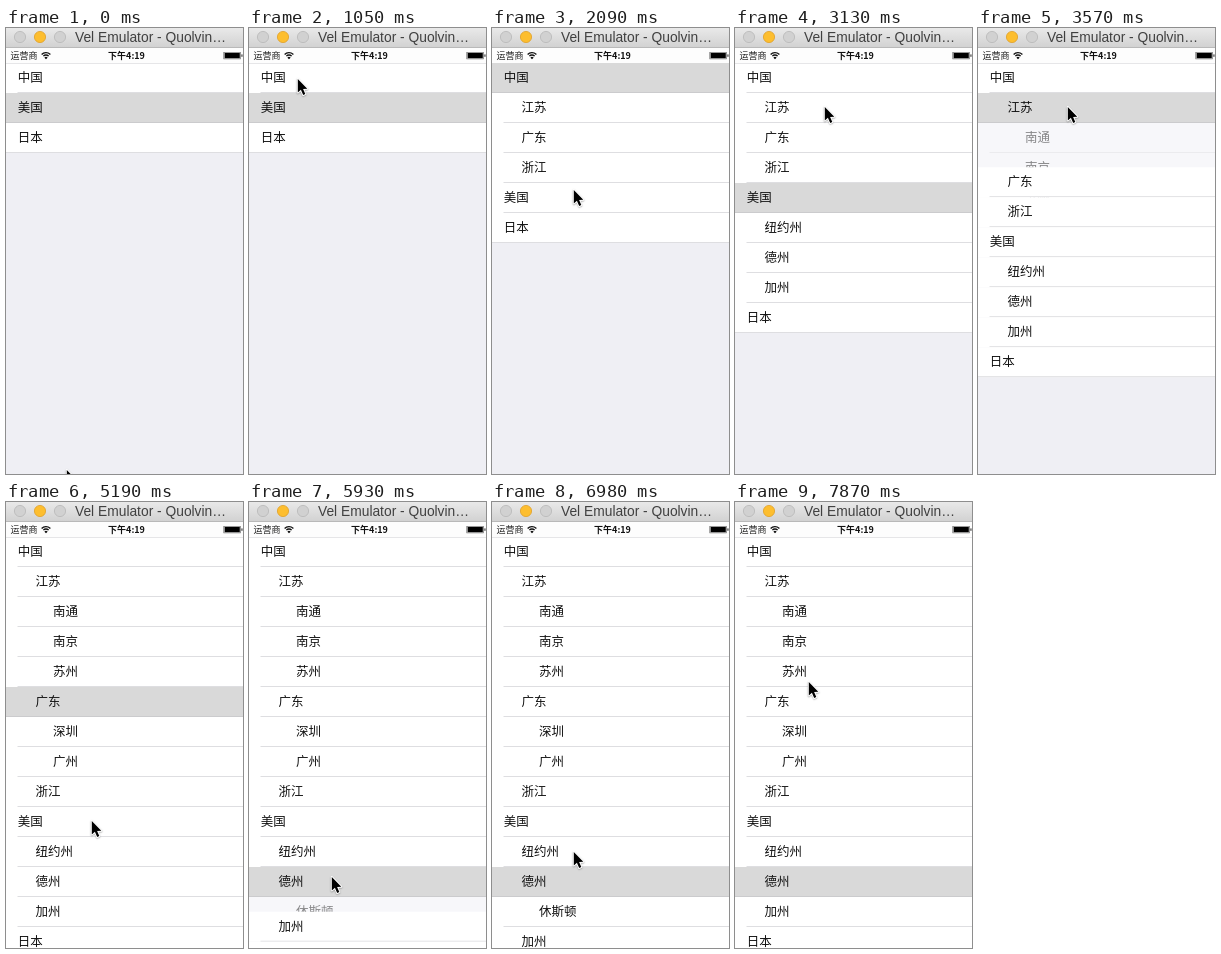
An HTML page with a canvas that plays this animation: 237 by 446 pixels, repeating every 8 s.

```html
<!DOCTYPE html>
<html lang="zh-CN">
<head>
<meta charset="utf-8">
<title>Tree list</title>
<style>
  html, body { margin: 0; width: 100%; height: 100%; overflow: hidden; background: #efeff4; }
  canvas { display: block; width: 237px; height: 446px; }
</style>
</head>
<body>
<canvas id="stage"></canvas>
<script>
const W = 237, H = 446, LOOP = 8000;
const STEP = 148.2;
const SLIDE = 300;             // row animation, ms
const ROW = 30, TOP = 35;
const CJK = '"Noto Sans CJK SC", "Noto Sans CJK JP", sans-serif';
const LATIN = '"Liberation Sans", Arial, sans-serif';

const canvas = document.getElementById('stage');
const ctx = canvas.getContext('2d');
const dpr = window.devicePixelRatio || 1;
canvas.width = W * dpr;
canvas.height = H * dpr;

const node = (name, ...kids) => ({ name, kids });
const tree = [
  node('中国',
    node('江苏', node('南通'), node('南京'), node('苏州')),
    node('广东', node('深圳'), node('广州')),
    node('浙江')),
  node('美国',
    node('纽约州'),
    node('德州', node('休斯顿')),
    node('加州')),
  node('日本')
];

// Each click selects a row and toggles its children.
const clicks = [
  [9, '中国'], [17, '美国'], [23, '江苏'], [31, '广东'], [39, '德州'], [49, '德州']
];

// Pointer path: step, x, y
const path = [
  [0, 60, 441], [1, 60, 425], [3, 69, 328], [4, 80, 210], [5, 85, 140],
  [7, 48, 50], [11, 48, 50], [14, 81, 161], [18, 81, 161], [21, 89, 78],
  [25, 89, 78], [30, 97, 205], [32, 97, 205], [35, 85, 318], [38, 82, 374],
  [43, 82, 374], [47, 81, 349], [49, 82, 370], [50, 82, 366], [53, 73, 179]
];

const clamp = v => Math.max(0, Math.min(1, v));
const ease = v => v * v * (3 - 2 * v);

function box(color, x, y, w, h) {
  ctx.fillStyle = color;
  ctx.fillRect(x, y, w, h);
}

function text(str, x, y, font, color, align = 'left') {
  ctx.font = font;
  ctx.fillStyle = color;
  ctx.textAlign = align;
  ctx.fillText(str, x, y);
}

function selectedAt(step) {
  const done = clicks.filter(([at]) => at <= step);
  return done.length ? done[done.length - 1][1] : '美国';
}

function openness(name, step) {
  let v = 0;
  for (const [at, target] of clicks) {
    if (target !== name || at > step) continue;
    const p = ease(clamp((step - at) * STEP / SLIDE));
    v = v ? 1 - p : p;
    if (v > 0.99) v = 1;
    if (v < 0.01) v = 0;
  }
  return v;
}

// Returns the y below the given rows; children fade in place while later rows slide.
function place(nodes, y, depth, alpha, step, out) {
  for (const n of nodes) {
    out.push({ name: n.name, y, depth, alpha });
    y += ROW;
    const v = n.kids.length ? openness(n.name, step) : 0;
    if (v > 0) y += (place(n.kids, y, depth + 1, alpha * v, step, out) - y) * v;
  }
  return y;
}

function drawRow(row, selected) {
  const on = row.name === selected;
  const left = on || row.name === '日本' ? 0 : 11.5;
  ctx.globalAlpha = row.alpha;
  box(on ? '#d9d9d9' : '#ffffff', 0, row.y, W, ROW);
  box(on ? '#cbcbcd' : '#dedee1', left, row.y + 29, W - left, 1);
  text(row.name, 11.8 + 17.6 * row.depth, row.y + 19.3, '12.5px ' + CJK, '#111');
  ctx.globalAlpha = 1;
}

function drawList(step) {
  const rows = [];
  const selected = selectedAt(step);
  place(tree, TOP, 0, 1, step, rows);
  rows.sort((a, b) => a.alpha - b.alpha);
  rows.forEach(row => drawRow(row, selected));
  if (selected !== '中国') box('#e6e6e8', 0, TOP, W, 1);
}

function light(x, fill, edge) {
  ctx.beginPath();
  ctx.arc(x, 9, 5.6, 0, Math.PI * 2);
  ctx.fillStyle = fill;
  ctx.fill();
  ctx.lineWidth = 0.8;
  ctx.strokeStyle = edge;
  ctx.stroke();
}

function drawTitle() {
  const g = ctx.createLinearGradient(0, 0, 0, 19);
  g.addColorStop(0, '#e9e9e9');
  g.addColorStop(1, '#d2d2d2');
  box(g, 0, 0, W, 19);
  box('#b9b9b9', 0, 19, W, 1);
  light(14, '#d1d1d1', '#b8b8b8');
  light(34, '#fdbe2f', '#e0a028');
  light(54, '#d1d1d1', '#b8b8b8');
  text('Vel Emulator - Quolvin…', 69, 14, '13.8px ' + LATIN, '#404040');
}

function drawStatus() {
  box('#fdfdfd', 0, 20, W, 15);
  text('运营商', 4.5, 31, '9px ' + CJK, '#222');
  text('下午4:19', 120.5, 31, 'bold 9px ' + CJK, '#111', 'center');

  ctx.strokeStyle = '#111';
  ctx.lineWidth = 1.3;
  for (const r of [3.6, 6]) {
    ctx.beginPath();
    ctx.arc(40, 30.6, r, -Math.PI * 0.76, -Math.PI * 0.24);
    ctx.stroke();
  }
  ctx.beginPath();
  ctx.moveTo(40, 31.2);
  ctx.arc(40, 31.2, 2.2, -Math.PI * 0.76, -Math.PI * 0.24);
  ctx.fillStyle = '#111';
  ctx.fill();

  ctx.lineWidth = 0.6;
  ctx.strokeStyle = '#555';
  ctx.strokeRect(217.8, 24.3, 16.8, 6.6);
  box('#000', 218.6, 25, 15.2, 5.2);
  box('#333', 235.4, 26.4, 1.1, 2.4);
}

function drawPointer(step) {
  let i = 1;
  while (i < path.length - 1 && path[i][0] < step) i++;
  const [s0, x0, y0] = path[i - 1], [s1, x1, y1] = path[i];
  const p = ease(clamp((step - s0) / (s1 - s0)));
  ctx.save();
  ctx.translate(x0 + (x1 - x0) * p, y0 + (y1 - y0) * p);
  ctx.beginPath();
  [[0.8, 1], [0.8, 14.6], [3.9, 11.7], [6.2, 17], [8.3, 16.1], [6.1, 11], [10.3, 10.8]]
    .forEach(([x, y]) => ctx.lineTo(x, y));
  ctx.closePath();
  ctx.lineJoin = 'round';
  ctx.lineWidth = 2;
  ctx.strokeStyle = '#fff';
  ctx.shadowColor = 'rgba(0,0,0,0.35)';
  ctx.shadowBlur = 1.5 * dpr;
  ctx.shadowOffsetY = 0.7 * dpr;
  ctx.stroke();
  ctx.shadowColor = 'transparent';
  ctx.fillStyle = '#000';
  ctx.fill();
  ctx.restore();
}

function render(ms) {
  const step = Math.floor(ms / STEP);
  ctx.setTransform(dpr, 0, 0, dpr, 0, 0);
  box('#efeff4', 0, 0, W, H);
  drawList(step);
  drawTitle();
  drawStatus();
  drawPointer(step);
}

const start = performance.now();
function tick() {
  render((performance.now() - start) % LOOP);
  requestAnimationFrame(tick);
}
tick();
</script>
</body>
</html>
```
